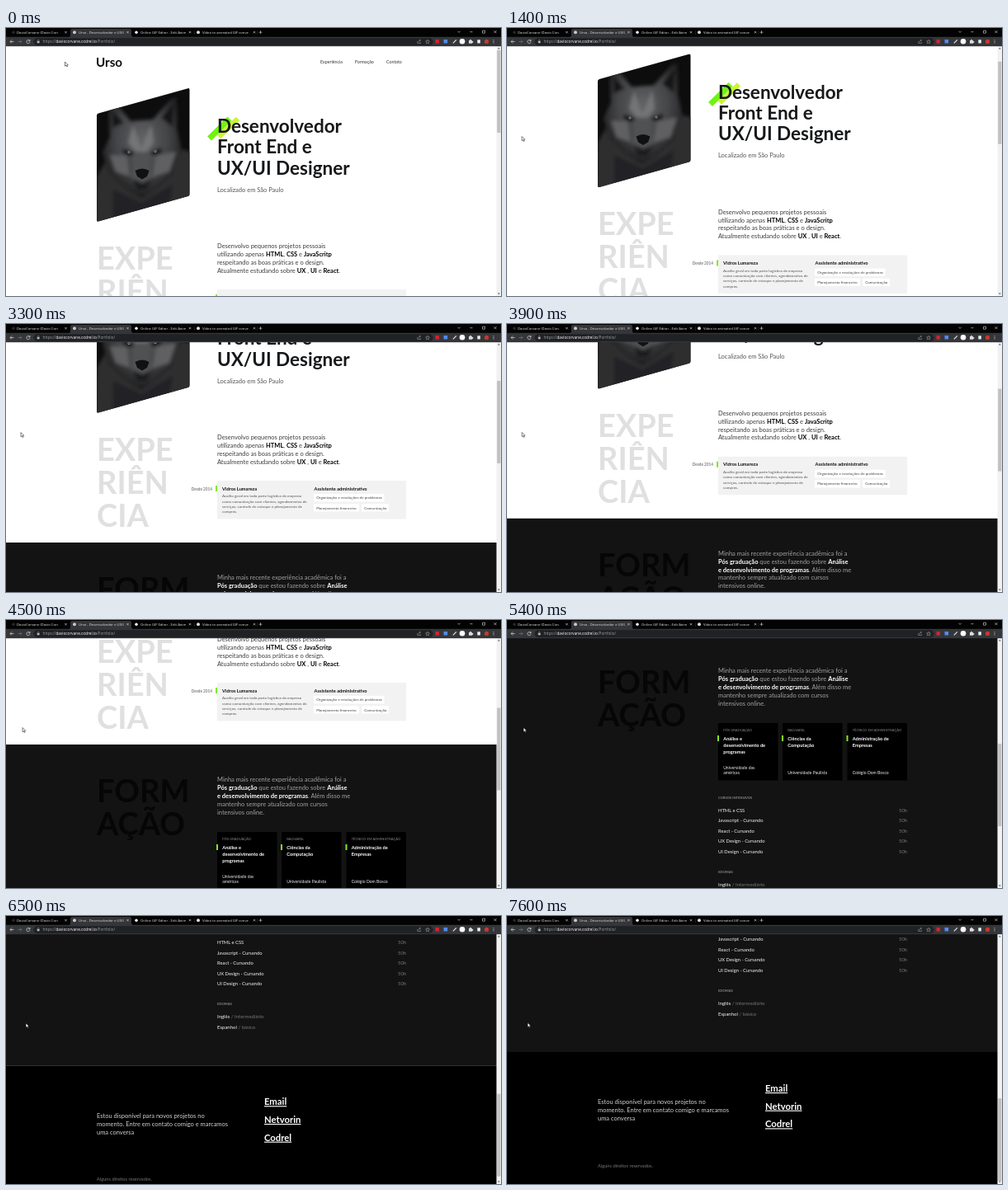
An HTML page for the animation above (8000 ms loop, 600 px wide and 325 px high).

```html
<!DOCTYPE html>
<html lang="pt">
<head>
<meta charset="utf-8">
<title>Portfolio</title>
<style>
html, body { margin: 0; width: 100%; height: 100%; overflow: hidden; background: #fff; }
svg { display: block; width: 600px; height: 325px; }
text { font-family: Lato, "Open Sans", sans-serif; white-space: pre; }
#chrome text { font-family: "Open Sans", "Noto Sans", sans-serif; }
</style>
</head>
<body>
<svg id="stage" viewBox="0 0 600 325" xmlns="http://www.w3.org/2000/svg">
  <defs>
    <clipPath id="frame"><path d="M112 103.5 220.5 73.2Q222.5 72.7 222.5 75V201.5Q222.5 203.5 220.5 204L112 234.5Q110 235 110 233V106Q110 104 112 103.5Z"/></clipPath>
    <filter id="soft" x="-20%" y="-20%" width="140%" height="140%"><feGaussianBlur stdDeviation="2.2"/></filter>
    <radialGradient id="fur" cx="50%" cy="42%" r="60%">
      <stop offset="0" stop-color="#626365"/><stop offset=".55" stop-color="#434446"/><stop offset="1" stop-color="#19191a"/>
    </radialGradient>
    <clipPath id="tab1"><rect x="12" y="0" width="51" height="11"/></clipPath>
    <clipPath id="tab2"><rect x="87" y="0" width="56" height="11"/></clipPath>
    <clipPath id="tab3"><rect x="162" y="0" width="56" height="11"/></clipPath>
    <clipPath id="tab4"><rect x="237" y="0" width="57" height="11"/></clipPath>
  </defs>
  <rect width="600" height="325" fill="#fff"/>
  <g id="page"></g>
  <g id="bar">
    <rect x="594.5" y="22" width="5.5" height="303" fill="#f1f1f1"/>
    <path d="M595.8 25.5h3l-1.5-1.8zM595.8 321.5h3l-1.5 1.8z" fill="#606060"/>
    <rect id="thumb" x="595.2" y="27" width="4.2" height="100" fill="#c1c1c1"/>
  </g>
  <g id="chrome"></g>
  <path id="cursor" d="M0 0V5.2L1.3 4.1 2.2 6 3.1 5.6 2.3 3.8H3.8Z" fill="#fff" stroke="#000" stroke-width=".5"/>
</svg>
<script>
const $ = id => document.getElementById(id);

const rect = (x, y, w, h, fill, r = 0) =>
  `<rect x="${x}" y="${y}" width="${w}" height="${h}" rx="${r}" fill="${fill}"/>`;
const path = (d, stroke, width, extra = '') =>
  `<path d="${d}" fill="none" stroke="${stroke}" stroke-width="${width}" ${extra}/>`;
const dot = (x, y, r, fill) => `<circle cx="${x}" cy="${y}" r="${r}" fill="${fill}"/>`;

// y is the middle of the capitals; *marked* runs become bold
function text(x, y, size, fill, str, { weight = 400, strong = fill, extra = '' } = {}) {
  const body = str.replace(/\*(.+?)\*/g, `<tspan font-weight="700" fill="${strong}">$1</tspan>`);
  return `<text x="${x}" y="${(y + size * 0.35).toFixed(2)}" font-size="${size}" font-weight="${weight}" fill="${fill}" ${extra}>${body}</text>`;
}
const lines = (x, y, step, size, fill, rows, opt) =>
  rows.map((row, i) => text(x, y + i * step, size, fill, row, opt)).join('');

const bold = { weight: 700 };
const lime = '#86e81c';

function portrait() {
  return `<g clip-path="url(#frame)">${rect(108, 70, 118, 168, '#0d0d0e')}
    <g filter="url(#soft)">
      <path d="M110 180 128 150 164 190 204 145 224 150V240H108Z" fill="#2d2d2f"/>
      <path d="M126 132 125 99 134 92 151 113 178 111 200 86 207 83 207 122 213 150 202 178 184 194 164 207 143 194 124 176 117 151Z" fill="url(#fur)"/>
      <path d="M129 121 129 100 143 115ZM188 109 203 91 202 120Z" fill="#151516"/>
      <path d="M154 118 164 145 176 117 179 139 170 151 158 151 148 139Z" fill="#747577"/>
      <path d="M126 154 146 155 150 180 133 174ZM182 155 206 150 198 174 177 181Z" fill="#606163"/>
      <path d="M156 150H173L177 181 165 196 151 181Z" fill="#505153"/>
      <path d="M141 146 156 151 151 156 142 152ZM174 151 189 145 188 152 178 155Z" fill="#101011"/>
      <path d="M154 183 165 188 177 183 170 196 159 196Z" fill="#1b1b1c"/>
      <path d="M130 196 164 212 202 190 194 240H130Z" fill="#242425"/>
    </g>
    <path d="M156.5 173Q165 168 173.5 173L171 180 165 183.5 159 180Z" fill="#111112"/>
    ${dot(149, 150.5, 1.5, '#a39a88')}${dot(181, 149.5, 1.5, '#a39a88')}
    ${dot(149, 150.5, .7, '#0a0a0a')}${dot(181, 149.5, .7, '#0a0a0a')}
  </g>`;
}

function intro() {
  return text(109, 41.5, 15.2, '#111', 'Urso', bold) +
    text(381, 41, 5.3, '#333', 'Experiência') +
    text(423, 41, 5.3, '#333', 'Formação') +
    text(461, 41, 5.3, '#333', 'Contato') +
    portrait() +
    path('M258 132 281 110', '#c9f531', 6) +
    path('M246.5 134 271 110', '#71f312', 7) +
    lines(256, 119.3, 25.3, 22.5, '#16181a', ['Desenvolvedor', 'Front End e', 'UX/UI Designer'], bold) +
    text(256, 196, 7.5, '#555', 'Localizado em São Paulo');
}

function experience() {
  const pill = (x, y, w, label) => rect(x, y, w, 9.4, '#fff', 1) + text(x + 3.2, y + 4.7, 4.6, '#444', label);
  return lines(110, 279.5, 40, 38, '#e0e0e0', ['EXPE', 'RIÊN', 'CIA'], bold) +
    lines(256, 264.7, 9.8, 7.5, '#3c3c3c', [
      'Desenvolvo pequenos projetos pessoais',
      'utilizando apenas *HTML*, *CSS* e *JavaScritp*',
      'respeitando as boas práticas e o design.',
      'Atualmente estudando sobre *UX* , *UI* e *React*.'], { strong: '#000' }) +
    rect(256, 317, 229, 46.5, '#f2f2f2') +
    text(250, 327, 4.7, '#555', 'Desde 2014', { extra: 'text-anchor="end"' }) +
    rect(254, 323, 2, 7, lime) +
    text(262, 326.5, 5.7, '#111', 'Vidros Lumareza', bold) +
    lines(262, 335.7, 6.25, 4.6, '#555', [
      'Auxilio geral em toda parte logística da empresa',
      'como comunicação com clientes, agendamentos de',
      'serviços, controle de estoque e planejamento de',
      'compras.']) +
    text(373.5, 326.5, 5.7, '#111', 'Assistente administrativo', bold) +
    pill(373, 333, 85.5, 'Organização e resoluções de problemas') +
    pill(373, 345.2, 55, 'Planejamento financeiro') +
    pill(431, 345.2, 33, 'Comunicação');
}

function education() {
  const card = (x, label, title, school) =>
    rect(x, 498, 72.5, 69.5, '#000', .6) + rect(x - 1, 513, 2, 7, lime) +
    text(x + 6.2, 507, 4.1, '#8a8a8a', label) +
    lines(x + 6.2, 516.5, 8, 5.7, '#fff', title, bold) +
    lines(x + 6.2, 558 - 6.2 * (school.length - 1), 6.2, 5.1, '#eee', school);
  const courses = ['HTML e CSS', 'Javascript - Cursando', 'React - Cursando', 'UX Design - Cursando', 'UI Design - Cursando'];
  const grey = s => `<tspan fill="#777">${s}</tspan>`;
  return rect(0, 392, 600, 361, '#131314') +
    lines(110, 449, 40, 38, '#060606', ['FORM', 'AÇÃO'], bold) +
    lines(256, 434.4, 9.9, 7.5, '#a2a2a2', [
      'Minha mais recente experiência acadêmica foi a',
      '*Pós graduação* que estou fazendo sobre *Análise*',
      '*e desenvolvimento de programas*. Além disso me',
      'mantenho sempre atualizado com cursos',
      'intensivos online.'], { strong: '#fff' }) +
    card(256, 'PÓS GRADUAÇÃO', ['Análise e', 'desenvolvimento de', 'programas'], ['Universidade das', 'américas']) +
    card(334, 'BACHAREL', ['Ciências da', 'Computação'], ['Universidade Paulista']) +
    card(412.5, 'TÉCNICO EM ADMINISTRAÇÃO', ['Administração de', 'Empresas'], ['Colégio Dom Bosco']) +
    text(256, 588.8, 4.1, '#8a8a8a', 'CURSOS INTENSIVOS', bold) +
    lines(256, 603.8, 12.5, 5.8, '#f4f4f4', courses) +
    lines(485, 603.8, 12.5, 5.8, '#777', courses.map(() => '50h'), { extra: 'text-anchor="end"' }) +
    text(256, 678.5, 4.1, '#8a8a8a', 'IDIOMAS', bold) +
    lines(256, 694, 12.5, 6, '#f4f4f4', ['Inglês ' + grey('/ Intermediário'), 'Espanhol ' + grey('/ básico')]);
}

function footer() {
  return rect(0, 753, 600, 165, '#000') +
    lines(110, 813.7, 10, 7.5, '#d2d2d2', [
      'Estou disponível para novos projetos no',
      'momento. Entre em contato comigo e marcamos',
      'uma conversa']) +
    lines(313, 797, 21.7, 11.3, '#fff', ['Email', 'Netvorin', 'Codrel'],
      { weight: 700, extra: 'text-decoration="underline"' }) +
    text(110, 890.5, 5.7, '#777', 'Alguns direitos reservados.');
}

function browser() {
  const cross = (x, y, r, c) => path(`M${x - r} ${y - r}l${2 * r} ${2 * r}m0 ${-2 * r}l${-2 * r} ${2 * r}`, c, .6);
  const tab = (n, x, label) =>
    `<g clip-path="url(#tab${n})">${text(x, 5.3, 4.2, '#e4e5e8', label)}</g>`;
  return rect(0, 0, 600, 11, '#030303') +
    `<path d="M76 11Q78 11 78 9V3Q78 1 80 1H150Q152 1 152 3V9Q152 11 154 11Z" fill="#35363a"/>` +
    rect(0, 10.8, 600, 11.4, '#35363a') +
    dot(9, 5.3, 1.8, '#26282b') + dot(83, 5.3, 2, '#c8cacd') + dot(158, 5.3, 1.8, '#eee') + dot(233, 5.3, 2, '#ddd') +
    tab(1, 13, 'DavioCorvane (Davio Corvane)') +
    tab(2, 88, 'Urso - Desenvolvedor e UX/UI Designer') +
    tab(3, 163, 'Online GIF Editor - Edit Animated') +
    tab(4, 238, 'Video to animated GIF converter') +
    [72.5, 147.5, 223, 301].map(x => cross(x, 5.2, 1.2, '#e0e0e0')).join('') +
    rect(228, 3, .4, 5, '#444') + rect(304.5, 3, .4, 5, '#444') +
    path('M306.5 5.2h4m-2-2v4', '#ddd', .6) +
    path('M547.5 3.8l1.6 1.6 1.6-1.6M562.3 4.7h3.2M577.5 3.2h3v3h-3z', '#ddd', .6) +
    cross(593, 4.7, 1.5, '#ddd') +
    rect(33.5, 12.3, 484, 8.6, '#202124', 4.3) +
    path('M9.5 16.5H5m2-2-2 2 2 2', '#e0e0e0', .7) +
    path('M14.5 16.5h4.5m-2-2 2 2-2 2', '#77797d', .7) +
    path('M28.8 15.5A2.1 2.1 0 1 0 29 17.2M29 14v1.8h-1.8', '#e0e0e0', .7) +
    rect(37.7, 16, 2.9, 2.3, '#b8babd', .3) + path('M38.3 16v-.7a.85 .85 0 0 1 1.7 0v.7', '#b8babd', .5) +
    text(44.5, 16.5, 4.7, '#9aa0a6', 'https://<tspan fill="#fff">daviocorvane.codrel.io</tspan>/Portfolio/') +
    path('M498.8 16v2.5h3.6V17M500 16.8q.2-1.9 2.3-1.9m-1-1.2 1.2 1.2-1.2 1.2', '#b8babd', .5) +
    path('M511 14.2l.7 1.5 1.7.2-1.2 1.2.3 1.7-1.5-.8-1.5.8.3-1.7-1.2-1.2 1.7-.2z', '#b8babd', .5) +
    rect(520.5, 14, 4.4, 4.8, '#d3222f', .8) +
    rect(530.5, 14, 4.6, 4.6, '#4f8cf0', .6) +
    path('M541.8 18.3l4-4', '#dfe3e6', 1.2) +
    dot(553, 16.3, 3.3, '#fff') +
    `<path d="M561 15h1.2a.9 .9 0 1 1 1.7 0h1.2v1.2a.9 .9 0 1 1 0 1.6v1h-4.1z" fill="#d8dadd"/>` +
    rect(571.3, 14.2, 3.6, 4.3, '#e8eaed', .4) +
    dot(582.5, 16.4, 2.6, '#c5392d') +
    [14.7, 16.4, 18.1].map(y => dot(591, y, .5, '#e0e0e0')).join('');
}

$('page').innerHTML = intro() + experience() + education() + footer();
$('chrome').innerHTML = browser();

const LOOP = 8000, STEP = 100;
// [time, offset]
const scroll = [[0, 0], [800, 0], [1400, 41.5], [1800, 62.5], [2200, 62.5], [2800, 94], [3000, 94],
  [3300, 127], [3500, 153], [3800, 153], [4500, 241], [5400, 373], [5900, 489], [6400, 566], [7000, 588], [LOOP, 588]];
// [time, x, y]
const pointer = [[0, 71.5, 41], [300, 48, 75], [600, 12, 128], [900, 18, 131.5], [3800, 18, 131.5],
  [4400, 20, 130.5], [5400, 20, 130.5], [5900, 22, 130.5], [7000, 25, 129.5], [LOOP, 25, 129.5]];

// monotone cubic through the keys: flat where the motion rests
function at(keys, t, col = 1) {
  let i = 0;
  while (i < keys.length - 2 && t >= keys[i + 1][0]) i++;
  const rate = k => keys[k] && keys[k + 1] ? (keys[k + 1][col] - keys[k][col]) / (keys[k + 1][0] - keys[k][0]) : 0;
  const slope = k => {
    const a = rate(k - 1), b = rate(k);
    return a * b > 0 ? 2 * a * b / (a + b) : 0;
  };
  const [p, q] = [keys[i], keys[i + 1]];
  const d = q[0] - p[0], u = (t - p[0]) / d, v = 1 - u;
  return p[col] * v * v * (1 + 2 * u) + q[col] * u * u * (3 - 2 * u) + d * u * v * (slope(i) * v - slope(i + 1) * u);
}

function draw(t) {
  const s = at(scroll, t);
  $('page').setAttribute('transform', `translate(0 ${(-s).toFixed(2)})`);
  $('thumb').setAttribute('y', (27 + s * 0.33).toFixed(2));
  $('cursor').setAttribute('transform', `translate(${at(pointer, t).toFixed(2)} ${at(pointer, t, 2).toFixed(2)})`);
}

const start = performance.now();
function tick() {
  const t = (performance.now() - start) % LOOP;
  draw(Math.floor(t / STEP) * STEP);
  requestAnimationFrame(tick);
}
tick();
</script>
</body>
</html>
```
